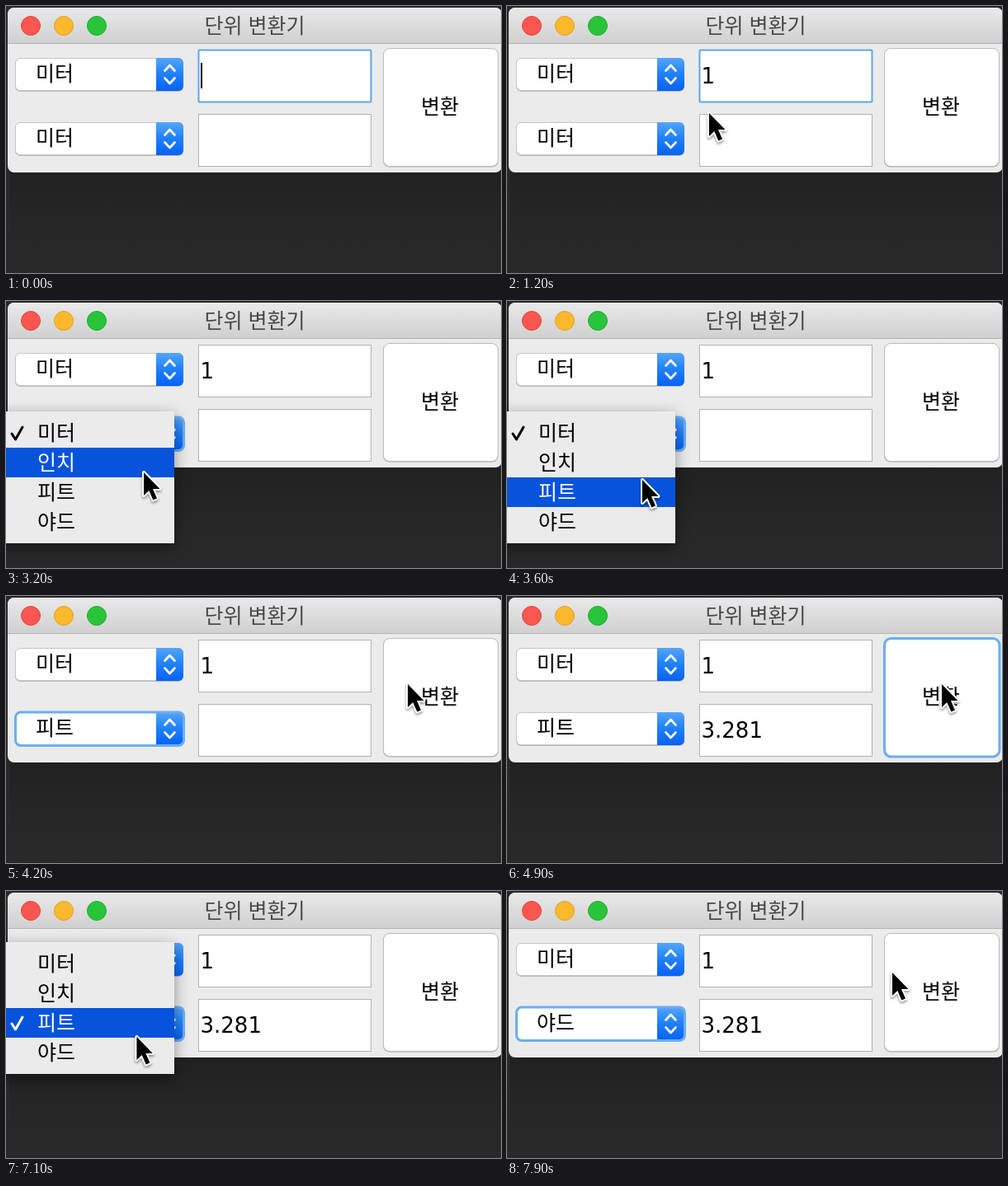
An HTML page for the animation above (8 s loop, 600 by 324 pixels).

```html
<!DOCTYPE html>
<html lang="ko">
<head>
<meta charset="utf-8">
<style>
  html, body { margin: 0; width: 100%; height: 100%; overflow: hidden; background: #292929; }
  svg { display: block; width: 600px; height: 324px; }
  text { font: 25px "Noto Sans CJK KR", "Noto Sans CJK", sans-serif; white-space: pre; }
  .num { font: 26px "DejaVu Sans", sans-serif; }
  .ring { fill: none; stroke: #6aaef0; stroke-width: 3; }
  .field { fill: #fff; stroke: #b2b2b2; }
  #popup { filter: drop-shadow(0 5px 9px #0006); }
  #cursor { filter: drop-shadow(0 2px 1.5px #0006); }
</style>
</head>
<body>
<svg viewBox="0 0 600 324">
  <defs>
    <linearGradient id="desk" x2="0" y2="1"><stop stop-color="#212121"/><stop offset=".7" stop-color="#282828"/><stop offset="1" stop-color="#292929"/></linearGradient>
    <linearGradient id="bar" x2="0" y2="1"><stop stop-color="#e9e9e9"/><stop offset="1" stop-color="#d0d0d0"/></linearGradient>
    <linearGradient id="blue" x2="0" y2="1"><stop stop-color="#54a5fa"/><stop offset=".5" stop-color="#1f80fb"/><stop offset="1" stop-color="#0762f4"/></linearGradient>
    <g id="combo">
      <rect x="11" y="1.2" width="204" height="39.6" rx="6" fill="#aaa"/>
      <rect x="11.5" y=".5" width="203" height="39" rx="5.5" fill="#fff" stroke="#c6c6c6"/>
      <path d="M182 0H209a6 6 0 0 1 6 6V34a6 6 0 0 1-6 6H182Z" fill="url(#blue)"/>
      <path d="M192.5 15.5l6-6.5 6 6.5M192.5 24.5l6 6.5 6-6.5" fill="none" stroke="#fff" stroke-width="2.6" stroke-linecap="round" stroke-linejoin="round"/>
    </g>
  </defs>

  <rect y="202" x="4" width="596" height="122" fill="url(#desk)"/>
  <rect x="2" y="2" width="599" height="200" rx="8" fill="#ebebeb"/>
  <path d="M2 45V10a8 8 0 0 1 8-8H593a8 8 0 0 1 8 8V45Z" fill="url(#bar)"/>
  <path d="M2 45.5H600" stroke="#b4b4b4"/>
  <g stroke-width="1">
    <circle cx="30" cy="24" r="11.5" fill="#fc5650" stroke="#e2443f"/>
    <circle cx="70" cy="24" r="11.5" fill="#fdb82c" stroke="#e1a029"/>
    <circle cx="110" cy="24" r="11.5" fill="#28c53b" stroke="#1eac2c"/>
  </g>
  <text x="301.5" y="33" text-anchor="middle" fill="#484848">단위 변환기</text>

  <use href="#combo" y="63"/>
  <text x="36" y="91">미터</text>
  <use href="#combo" y="141"/>
  <text id="unit" x="36" y="169"></text>
  <rect id="comboRing" class="ring" x="11.5" y="141" width="204" height="40.5" rx="6.5"/>

  <rect class="field" x="233.5" y="53.5" width="209" height="63"/>
  <rect id="fieldRing" class="ring" x="233.5" y="53.5" width="209" height="63" rx="1" style="stroke-width:2;stroke:#5ea6e8"/>
  <text id="input" class="num" x="235.5" y="94">1</text>
  <rect id="caret" y="69" width="2" height="31"/>
  <rect class="field" x="233.5" y="131.5" width="209" height="63"/>
  <text id="result" class="num" x="235.5" y="172">3.281</text>

  <rect x="457" y="52" width="140" height="143.5" rx="8" fill="#aaa"/>
  <rect id="button" x="457.5" y="51.5" width="139" height="143" rx="7.5" stroke="#bcbcbc"/>
  <rect id="buttonRing" class="ring" x="457.5" y="51.5" width="139.5" height="143.5" rx="8"/>
  <text x="503" y="131">변환</text>

  <g id="popup">
    <rect x="-20" width="224" height="160" fill="#ebebeb"/>
    <rect id="mark" x="-20" width="224" height="36" fill="#0653dc"/>
    <path id="check" d="M7 19l4.5 7L20 11" fill="none" stroke-width="3" stroke-linecap="round" stroke-linejoin="round"/>
    <g id="items"></g>
  </g>
  <path id="cursor" d="M0 0V28L6.3 22 11.3 33.5 16 31.5 11 20H19.5Z" stroke="#fff" stroke-width="4" stroke-linejoin="round" paint-order="stroke"/>
</svg>
<script>
const $ = id => document.getElementById(id);
const UNITS = ["미터", "인치", "피트", "야드"];
const ROW = 36, PAD = 8;

// time, x, y of the pointer tip
const PATH = [
  [600, 508, 145], [900, 421, 128], [1200, 245, 130], [1400, 190, 140], [1600, 190, 140],
  [2000, 180, 152], [2500, 182, 152], [2800, 179, 172], [3200, 167, 208], [3300, 164, 217],
  [3700, 164, 217], [3900, 300, 165], [4200, 487, 107], [4400, 527, 107], [5400, 527, 107],
  [5700, 440, 78], [6000, 290, 92], [6300, 175, 139], [6400, 156, 159], [6800, 156, 159],
  [7300, 160, 189], [7500, 165, 189], [7700, 329, 148], [7900, 467, 99]
];

UNITS.forEach((name, i) => {
  const item = document.createElementNS("http://www.w3.org/2000/svg", "text");
  item.textContent = name;
  item.setAttribute("x", 38);
  item.setAttribute("y", PAD + ROW * i + 27);
  $("items").append(item);
});

const set = (id, name, value) => $(id).setAttribute(name, value);
const show = (id, on) => set(id, "visibility", on ? "visible" : "hidden");
const move = (id, x, y) => set(id, "transform", `translate(${x} ${y})`);

function pointer(t) {
  const next = PATH.findIndex(p => p[0] > t);
  if (next < 0) return PATH.at(-1).slice(1);
  if (!next) return PATH[0].slice(1);
  const [t0, x0, y0] = PATH[next - 1], [t1, x1, y1] = PATH[next];
  const k = (t - t0) / (t1 - t0);
  return [x0 + (x1 - x0) * k, y0 + (y1 - y0) * k];
}

function drawPopup(t, y) {
  const open = t >= 1600 && t < 3700 || t >= 6600 && t < 7600;
  show("popup", open);
  if (!open) return;
  const checked = t < 5000 ? 0 : 2;
  const top = 134 - checked * ROW;
  const row = Math.max(0, Math.min(3, Math.floor((y - top - PAD) / ROW)));
  move("popup", 0, top);
  set("mark", "y", PAD + row * ROW);
  move("check", 0, PAD + checked * ROW);
  set("check", "stroke", row === checked ? "#fff" : "#000");
  [...$("items").children].forEach((item, i) => item.setAttribute("fill", i === row ? "#fff" : "#000"));
}

function draw(t) {
  const [x, y] = pointer(t);
  const typed = t >= 300;
  show("cursor", t >= 600);
  move("cursor", x, y);
  show("input", typed);
  show("fieldRing", t < 1600);
  set("caret", "x", typed ? 252 : 236);
  show("caret", t < 1600 && (!typed || (t - 300) % 1000 < 500));
  $("unit").textContent = UNITS[t < 3700 ? 0 : t < 7600 ? 2 : 3];
  show("comboRing", t >= 1600 && t < 4600 || t >= 6600);
  show("buttonRing", t >= 4600 && t < 6600);
  set("button", "fill", t >= 4600 && t < 4900 ? "#dedede" : "#fff");
  show("result", t >= 4900);
  drawPopup(t, y);
}

const start = performance.now();
function tick() {
  const t = (performance.now() - start) % 8000;
  draw(Math.floor(t / 100) * 100);
  requestAnimationFrame(tick);
}
tick();
</script>
</body>
</html>
```
